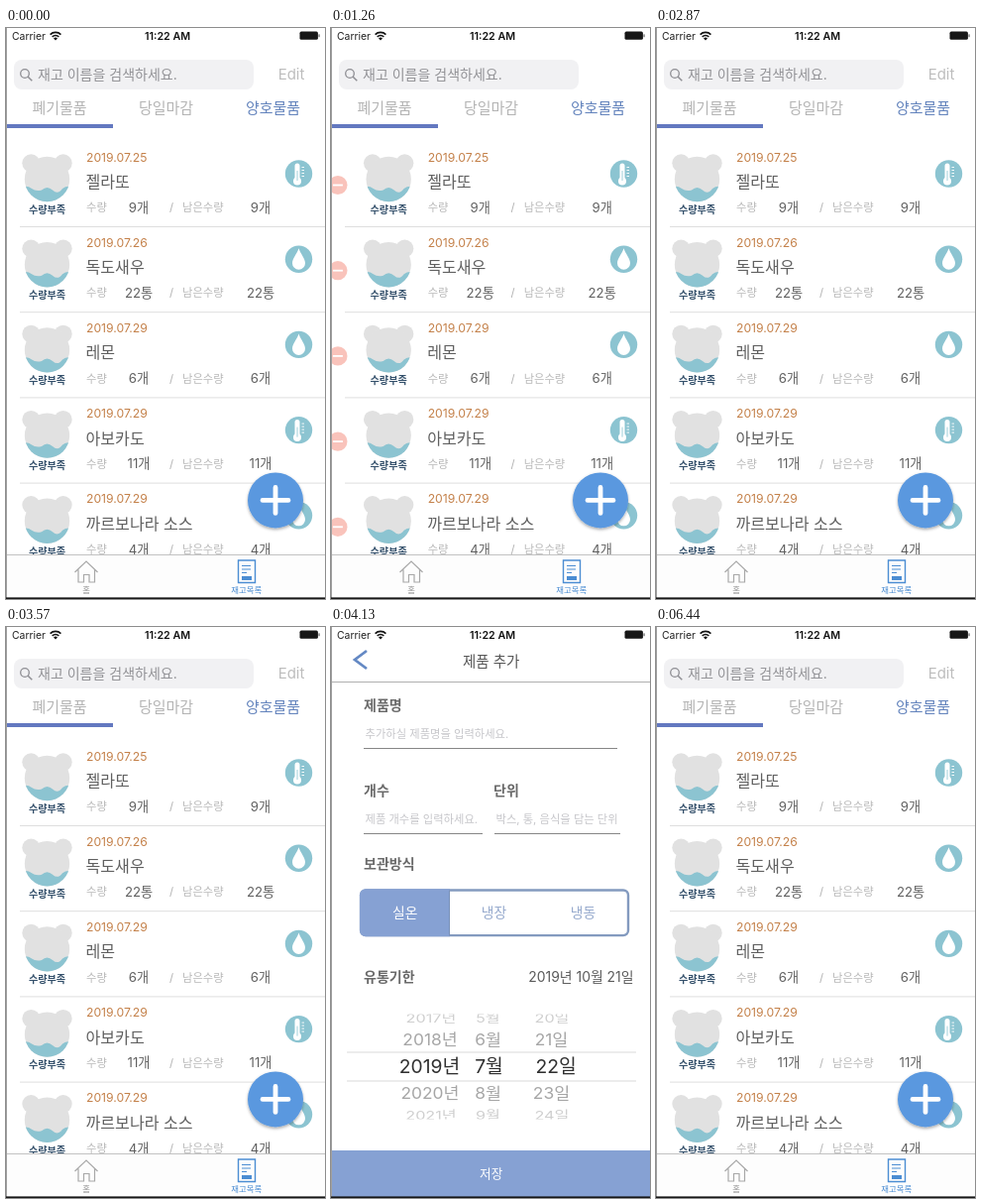
Recreate the animation shown at these times as an HTML page. Size 322 by 576 pixels, loop 6650 ms.

```html
<!DOCTYPE html>
<html lang="ko">
<head>
<meta charset="utf-8">
<title>재고목록</title>
<style>
html, body { margin: 0; width: 100%; height: 100%; overflow: hidden; background: #fff; }
svg { display: block; width: 322px; height: 576px; }
text { font-family: Inter, "Noto Sans CJK KR", "Noto Sans CJK", sans-serif; white-space: pre; }
</style>
</head>
<body>
<svg id="stage" viewBox="0 0 322 576" xmlns="http://www.w3.org/2000/svg"></svg>
<script>
const LOOP = 6650;
const PITCH = 86.2;
const TEAL = '#8cc4d1', BLUE = '#86a1d3';
const BOLD = 'font-weight="700"';

// y is the visual middle of the line
const text = (s, x, y, size, fill, anchor = 'start', more = '') =>
  `<text x="${x}" y="${(y + size * 0.37).toFixed(2)}" font-size="${size}" fill="${fill}" text-anchor="${anchor}" ${more}>${s}</text>`;
const mid = (s, x, y, size, fill, more) => text(s, x, y, size, fill, 'middle', more);
const rect = (x, y, w, h, fill, more = '') =>
  `<rect x="${x}" y="${y}" width="${w}" height="${h}" fill="${fill}" ${more}/>`;
const disc = (x, y, r, fill, more = '') => `<circle cx="${x}" cy="${y}" r="${r}" fill="${fill}" ${more}/>`;
const line = (d, stroke, width, more = '') =>
  `<path d="${d}" fill="none" stroke="${stroke}" stroke-width="${width}" ${more}/>`;

const items = [
  ['2019.07.25', '젤라또', '9개', 'heat'],
  ['2019.07.26', '독도새우', '22통', 'drop'],
  ['2019.07.29', '레몬', '6개', 'drop'],
  ['2019.07.29', '아보카도', '11개', 'heat'],
  ['2019.07.29', '까르보나라 소스', '4개', 'drop']
];

const bear = disc(25.3, 136.3, 9, '#e1e1e1') + disc(57.7, 136.3, 9, '#e1e1e1') +
  disc(41.5, 152.5, 22.7, '#e1e1e1') +
  `<path clip-path="url(#head)" fill="${TEAL}" d="M18 160 Q22 159 26 162 T36 163.5 Q41.5 158.5 47 163.5 T57 162 Q61 159 65 160 V178 H18Z"/>`;

const icons = {
  heat: line('M294 139V154', '#fff', 5, 'stroke-linecap="round"') + disc(294, 154.5, 4, '#fff') +
    line('M294 144V154', TEAL, 0.8) +
    line('M298.5 140.5h2.5M298.5 143.5h2.5M298.5 146.5h2.5M298.5 149.5h2.5', '#fff', 0.9),
  drop: '<path fill="#fff" d="M295.5 136C297.5 142 302 146 302 151A6.5 6.5 0 0 1 289 151C289 146 293.5 142 295.5 136Z"/>'
};

const row = ([date, name, count, icon], i) => `<g transform="translate(0 ${i * PITCH})">
  <g class="minus">${disc(0, 158.5, 9.6, '#f05a42')}${rect(-5, 157.6, 10, 1.8, '#fff')}</g>
  ${disc(295.5, 147, 13.7, TEAL)}${icons[icon]}
  <g class="cell">${bear}
  ${mid('수량부족', 41.5, 183, 10.1, '#34506b', BOLD)}
  ${text(date, 81, 130, 12.2, '#c4814a')}
  ${text(name, 80.5, 155, 16.1, '#606060')}
  ${text('수량', 81, 181, 11.3, '#b8b8b8')}
  ${mid(count, 134, 181, 13.2, '#606060')}
  ${mid('/', 167, 181, 11.3, '#b0b0b0')}
  ${text('남은수량', 178, 181, 11.3, '#b8b8b8')}
  ${mid(count, 257, 181, 13.2, '#606060')}</g>
  ${rect(14, 200, 308, 1, '#dedede')}</g>`;

const list = `<g>${items.map(row).join('')}
  ${rect(8, 32, 242, 30, '#f1f1f3', 'rx="8"')}
  <circle cx="19" cy="46" r="4.3" fill="none" stroke="#8e8e93" stroke-width="1.3"/>
  ${line('M22.2 49.2L26.3 53.3', '#8e8e93', 1.5)}
  ${text('재고 이름을 검색하세요.', 32, 46.5, 14, '#929296')}
  <g id="edit">${mid('Edit', 288, 46.5, 15, '#bdbdbd')}</g>
  <g id="done">${mid('Done', 288, 46.5, 15, '#bdbdbd')}</g>
  ${mid('폐기물품', 54, 80, 15, '#b4b4b4')}
  ${mid('당일마감', 161.5, 80, 15, '#b4b4b4')}
  ${mid('양호물품', 269.5, 80, 15, '#6484bd')}
  ${rect(0, 97, 108, 4, '#6378c0')}
  ${disc(272, 476.4, 28, '#5a98df', 'filter="url(#lift)"')}
  ${line('M272 463.4V489.4M259 476.4H285', '#fff', 4.8, 'stroke-linecap="round"')}
  ${rect(0, 531, 322, 45, '#fdfdfd')}${rect(0, 531, 322, 1, '#c2c2c2')}
  ${line('M69.5 549L81 538L92.5 549M73 546.5V559H78.5V551.5H84V559H89.5V546.5', '#a8a8a8', 1.2)}
  ${mid('홈', 81, 567, 8.3, '#8f8f8f')}
  ${line('M234.5 537H251.5V559.5H234.5Z', '#4b8dd3', 1.4)}
  ${line('M238 542.5H247M238 546H247M238 549.5H243', '#4b8dd3', 1)}
  ${rect(238, 553, 10, 4, '#4b8dd3')}
  ${mid('재고목록', 242.7, 567, 8.4, '#4b8dd3')}</g>`;

const wheelRow = (n, y, sx, sy, fill, xs) =>
  [`${2019 + n}년`, `${7 + n}월`, `${22 + n}일`].map((s, i) =>
    `<g transform="translate(${xs[i]} ${y}) scale(${sx} ${sy})">${mid(s, 0, 0, 19.3, fill)}</g>`).join('');
const side = [100, 158.5, 222.5], far = [101, 158.5, 223];
const wheel = `<g clip-path="url(#drum)">` +
  wheelRow(-2, 394.5, 0.84, 0.64, '#cfcfcf', far) + wheelRow(-1, 416.2, 0.9, 0.85, '#a6a6a6', side) +
  wheelRow(0, 443, 1, 1, '#303030', [99.5, 159.5, 227]) +
  wheelRow(1, 470.2, 0.9, 0.85, '#a6a6a6', side) + wheelRow(2, 492.2, 0.84, 0.64, '#cfcfcf', far) + '</g>' +
  rect(16, 428.5, 292, 1, '#dadada') + rect(16, 457.5, 292, 1, '#dadada');

const label = (s, x, y) => text(s, x, y, 14, '#6a6a6a', 'start', BOLD);
const field = (s, x, y, w) =>
  text(s, x + 1.5, y, 11.3, '#c6c6ca') + rect(x, y + 14, w, 1, '#868686');

const form = `<g id="form">${rect(0, 0, 322, 576, '#fff')}
  ${line('M36 24L24 33L36 42', '#6489c4', 2.8)}
  ${mid('제품 추가', 161.7, 35, 14.5, '#555')}
  ${rect(0, 55, 322, 1, '#b0b0b0')}
  ${label('제품명', 33, 79)}${field('추가하실 제품명을 입력하세요.', 33, 108, 256)}
  ${label('개수', 33, 165)}${field('제품 개수를 입력하세요.', 33, 194, 120)}
  ${label('단위', 164, 165)}${field('박스, 통, 음식을 담는 단위', 165, 194, 127)}
  ${label('보관방식', 33, 239)}
  ${rect(30, 265.5, 270, 45.6, '#fff', 'rx="5" stroke="#839abf" stroke-width="2.4"')}
  <path d="M120 264.3V312.3H35A6 6 0 0 1 29 306.3V270.3A6 6 0 0 1 35 264.3Z" fill="${BLUE}"/>
  ${rect(119, 265.5, 1, 46, '#7890b8')}
  ${mid('실온', 74.7, 288, 13.8, '#fff')}
  ${mid('냉장', 164.5, 288, 13.8, '#94a8cc')}
  ${mid('냉동', 254.5, 288, 13.8, '#94a8cc')}
  ${label('유통기한', 33, 353)}
  ${text('2019년 10월 21일', 305.5, 353, 13.9, '#5a5a5a', 'end')}
  ${wheel}
  ${rect(0, 528, 322, 48, BLUE)}${mid('저장', 161.7, 551, 12.6, '#fff')}</g>`;

const status = `${text('Carrier', 6, 8, 10.4, '#222')}
  ${mid('11:22 AM', 163, 8, 10.7, '#111', 'font-weight="600"')}
  ${line('M44.6 6.6A7.6 7.6 0 0 1 55.4 6.6M46.7 8.9A4.6 4.6 0 0 1 53.3 8.9', '#111', 1.6)}
  <path d="M48 10.4A2.8 2.8 0 0 1 52 10.4L50 12.5Z" fill="#111"/>
  ${rect(296.5, 3.6, 18.4, 8.2, '#161616', 'rx="1.6"')}${rect(315.5, 6.2, 1.1, 3, '#555', 'rx=".5"')}`;

const stage = document.getElementById('stage');
stage.innerHTML = `<defs><clipPath id="head"><circle cx="41.5" cy="152.5" r="22.7"/></clipPath>
  <clipPath id="drum"><rect x="16" y="390.5" width="292" height="106"/></clipPath>
  <filter id="lift" x="-30%" y="-30%" width="160%" height="160%">
  <feDropShadow dx="0" dy="1.5" stdDeviation="1.6" flood-color="#000" flood-opacity=".35"/></filter></defs>
  ${rect(0, 0, 322, 576, '#fff')}${list}${form}${status}
  ${rect(0, 0, 1, 576, '#a0a0a0')}${rect(0, 574.4, 322, 1.6, '#161616')}`;

const byId = id => document.getElementById(id);
const edit = byId('edit'), done = byId('done'), sheet = byId('form');
const cells = stage.querySelectorAll('.cell'), minuses = stage.querySelectorAll('.minus');

const ramp = (t, a, b) => Math.min(1, Math.max(0, (t - a) / (b - a)));
const ease = u => u * u * (3 - 2 * u);
// Critically damped spring: 1 at the start, settling to 0
const spring = ms => {
  const w = Math.max(0, ms) * 0.017;
  return (1 + w) * Math.exp(-w);
};

function draw(t) {
  const open = ease(ramp(t, 1110, 1410)) - ease(ramp(t, 2110, 2410));
  cells.forEach(c => c.setAttribute('transform', `translate(${33 * open} 0)`));
  minuses.forEach(m => {
    m.setAttribute('transform', `translate(${-9 + 31.5 * open} 0)`);
    m.setAttribute('opacity', open < 0.5 ? open * 0.7 : 0.35 + (open - 0.5) * 1.3);
  });
  edit.setAttribute('opacity', 1 - ramp(t, 910, 1120) + ramp(t, 2380, 2600));
  done.setAttribute('opacity', ramp(t, 1300, 1530) - ramp(t, 1900, 2125));

  let y = t < 6000 ? 576 * spring(t - 3580) : 576 * (1 - spring(t - 6000));
  if (t > 4120 && t < 6000) y = 0;
  sheet.setAttribute('transform', `translate(0 ${y})`);
  sheet.setAttribute('display', t < 3580 || t > 6430 ? 'none' : 'inline');
}

const start = performance.now();
function tick() {
  draw((performance.now() - start) % LOOP);
  requestAnimationFrame(tick);
}
tick();
</script>
</body>
</html>
```
